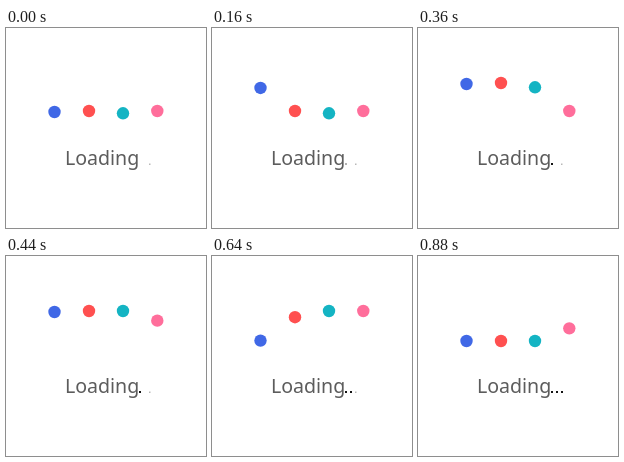
Animation, 200 px wide and 200 px high, one loop 920 ms. Source, as an HTML page with a canvas:

```html
<!DOCTYPE html>
<html lang="en">
<head>
<meta charset="utf-8">
<title>Loading</title>
<style>
html, body { margin: 0; width: 100%; height: 100%; overflow: hidden; background: #fff; }
canvas { display: block; width: 200px; height: 200px; }
</style>
</head>
<body>
<canvas id="stage" width="200" height="200"></canvas>
<script>
const ctx = document.getElementById('stage').getContext('2d');
const LOOP = 920, STEP = 40, STAGGER = 100;
const RISE = { from: 62, to: 192 };
const FALL = { from: 492, to: 652 };
const BASELINE = 137;

const balls = [
  { x: 48.5, start: 84, top: 56, end: 85, color: '#4068e6' },
  { x: 83, start: 83, top: 55, end: 85, color: '#ff5050' },
  { x: 117, start: 85.3, top: 55, end: 85, color: '#14b4c3' },
  { x: 151.3, start: 83, top: 55, end: 85, color: '#ff6e9b' }
];

const dots = [
  { x: 133, from: 80, to: 320, rest: 0 },
  { x: 138, from: 460, to: 640, rest: 0 },
  { x: 143, from: 760, to: 880, rest: 0.3 }
];

const progress = (t, { from, to }) => Math.min(1, Math.max(0, (t - from) / (to - from)));
const ease = u => (1 - Math.cos(Math.PI * u)) / 2;

function drawBall(ball, t) {
  const up = ease(progress(t, RISE));
  const down = ease(progress(t, FALL));
  const y = ball.start + (ball.top - ball.start) * up + (ball.end - ball.top) * down;
  ctx.fillStyle = ball.color;
  ctx.beginPath();
  ctx.arc(ball.x, y, 6.2, 0, 2 * Math.PI);
  ctx.fill();
}

function drawDot(dot, t) {
  const shown = progress(t, dot);
  const size = shown > 0 || !dot.rest ? 2 : 1.5;
  ctx.fillStyle = `rgba(20, 20, 20, ${dot.rest + (1 - dot.rest) * shown})`;
  ctx.fillRect(dot.x, BASELINE - size, size, size);
}

function draw(t) {
  ctx.fillStyle = '#fff';
  ctx.fillRect(0, 0, 200, 200);
  balls.forEach((ball, i) => drawBall(ball, t - i * STAGGER));
  ctx.fillStyle = '#5c5c5c';
  ctx.font = '19.6px "Noto Sans", "Open Sans", sans-serif';
  ctx.fillText('Loading', 58.9, BASELINE);
  dots.forEach(dot => drawDot(dot, t));
}

const origin = performance.now();
function tick() {
  const t = (performance.now() - origin) % LOOP;
  draw(Math.floor(t / STEP) * STEP);
  requestAnimationFrame(tick);
}
tick();
</script>
</body>
</html>
```
